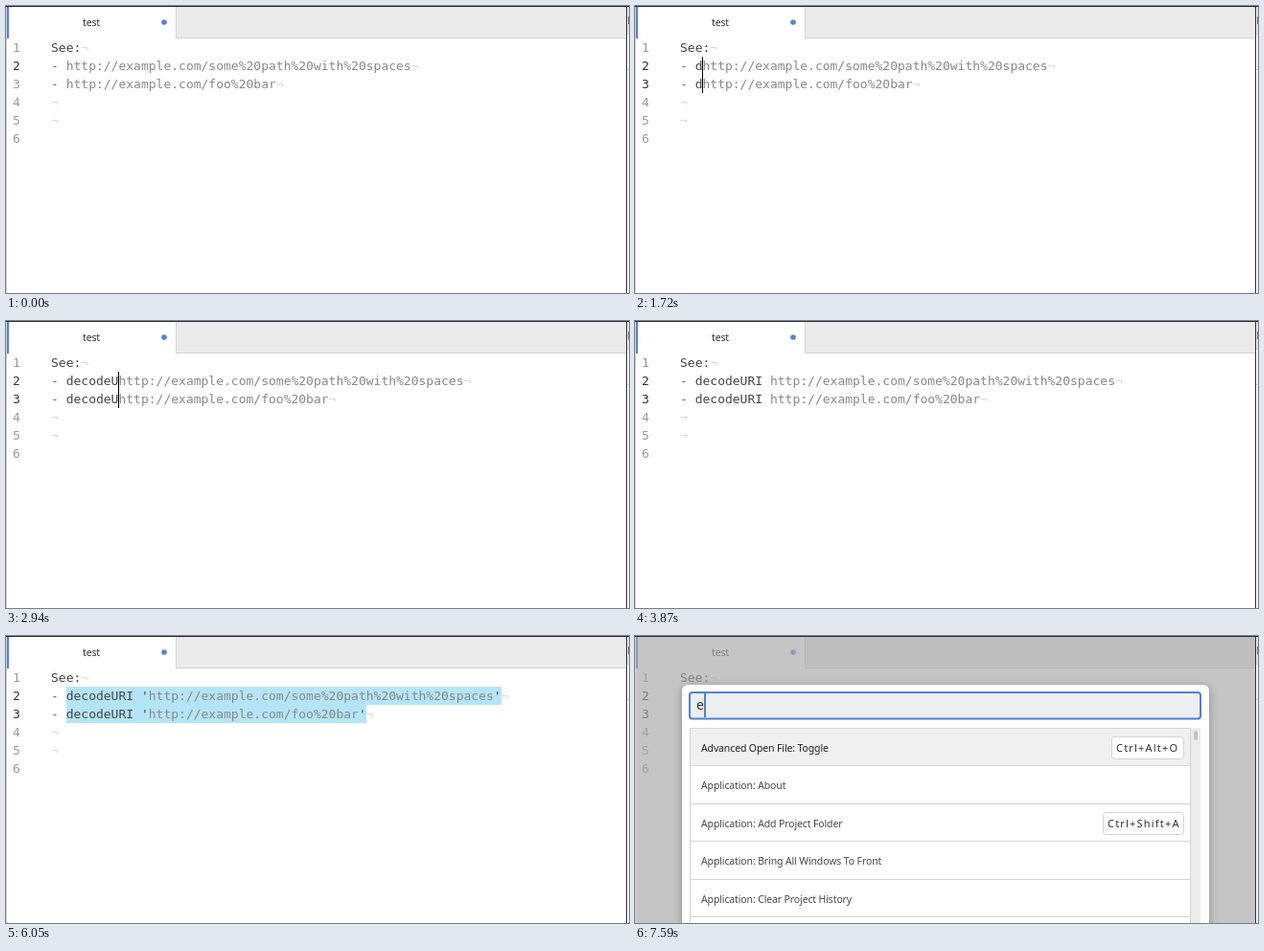
Animation, 650 px wide and 300 px high, one loop 8000 ms. Source, as an HTML page:

```html
<!DOCTYPE html>
<html lang="en">
<head>
<meta charset="utf-8">
<title>Editor</title>
<style>
  html, body { margin: 0; width: 650px; height: 300px; overflow: hidden; background: #fff; }
  svg { display: block; }
  text { white-space: pre; }
  .code { font: 13px "DejaVu Sans Mono", monospace; fill: #444; }
  .ui { font: 10.5px "Noto Sans", sans-serif; letter-spacing: -.13px; fill: #484848; }
  .keys { font: 11px "Noto Sans", sans-serif; letter-spacing: 1.2px; fill: #333; }
  .num { fill: #999; }
  .num.active { fill: #333; }
  .dash { fill: #6c6c6c; }
  .url { fill: #888; }
  .eol { fill: #d9d9d9; }
  .sel { fill: #b4e5f7; }
  .line { fill: #d4d4d4; }
  .box { fill: #fff; stroke: #d4d4d4; }
  .panel { fill: #fff; filter: drop-shadow(0 2px 4px rgba(0, 0, 0, .3)); }
</style>
</head>
<body>
<svg width="650" height="300" viewBox="0 0 650 300">
  <rect width="650" height="300" fill="#fff"/>
  <rect x="178" y="1" width="469" height="32" fill="#eaeaea"/>
  <rect class="line" x="177" y="1" width="1" height="33"/>
  <rect class="line" x="177" y="33" width="470" height="1"/>
  <rect x="1" y="1" width="2" height="33" fill="#5381dc"/>
  <text class="ui" x="89" y="21" text-anchor="middle" style="fill:#333">test</text>
  <circle cx="165" cy="17" r="2.8" fill="#5381e0"/>

  <g id="editor" class="code"></g>
  <rect id="dim" x="1" y="1" width="646" height="299" fill="#a8a8a8" opacity="0"/>

  <g id="palette">
    <rect class="panel" x="49" y="51" width="550" height="270" rx="6"/>
    <rect x="57" y="59" width="533" height="27.5" rx="3" fill="#edeef0" stroke="#4f80d9" stroke-width="2"/>
    <text id="query" x="64" y="77" style="font:14px 'Noto Sans',sans-serif;fill:#333">e</text>
    <rect id="caret" y="60" width="2" height="25" fill="#4f80d9"/>
    <g id="list"></g>
    <rect x="580" y="96" width="10" height="204" fill="#ebebeb"/>
    <rect x="583" y="99" width="4" height="10" rx="2" fill="#c2c2c2"/>
  </g>

  <rect width="647" height="1" fill="#2b2d38"/>
  <rect class="line" y="1" width="1" height="299"/>
  <rect x="648" width="2" height="300" fill="#fafafa"/>
  <rect x="648" y="1" width="2" height="28" fill="#e4e4e4"/>
  <rect x="649" y="11" width="1" height="8" fill="#777"/>
  <rect class="line" x="648" y="29" width="2" height="1"/>
  <rect class="line" x="648" y="66" width="2" height="1"/>
  <rect x="647" width="1" height="300" fill="#33343c"/>
  <rect x="647" width="3" height="1" fill="#2b2d38"/>
</svg>
<script>
const LOOP = 8000, LEFT = 47, CHAR = 13 * 0.60205, ROW = 19;
const $ = id => document.getElementById(id);
const colX = col => LEFT + col * CHAR;

function add(parent, tag, attrs, text = '') {
  const el = document.createElementNS('http://www.w3.org/2000/svg', tag);
  for (const k in attrs) el.setAttribute(k, attrs[k]);
  el.textContent = text;
  parent.append(el);
  return el;
}

// Timing of the edit, in ms
const COMMAND = "decodeURI '";
const keyTimes = [1720, 1890, 2130, 2270, 2380, 2550, 2940, 3090, 3220, 3420, 3960];
const caretOff = [[0, 290], [660, 720], [1190, 1590], [3870, 3960], [4900, 5030], [5360, LOOP]];
const SECOND_CARET = 720, JUMP_TO_END = 4380, CLOSE_QUOTE = 5030;
const selectTimes = [5360, 5880, 6050];
const OPEN = 7130, QUERY = 7590;

const editor = $('editor');
const baseline = row => 48 + row * ROW;
const numbers = [...Array(6).keys()].map(i =>
  add(editor, 'text', { class: 'num', x: 7, y: baseline(i) }, i + 1));
numbers[1].classList.add('active');

add(editor, 'text', { x: LEFT, y: baseline(0) }, 'See:');
add(editor, 'text', { class: 'eol', x: colX(4), y: baseline(0) }, '¬');
for (const row of [3, 4]) add(editor, 'text', { class: 'eol', x: LEFT, y: baseline(row) }, '¬');

const lines = ['http://example.com/some%20path%20with%20spaces', 'http://example.com/foo%20bar']
  .map((url, i) => {
    const top = 53 + i * ROW;
    const sel = add(editor, 'rect', { class: 'sel', y: top, height: ROW });
    const text = add(editor, 'text', { x: LEFT, y: baseline(i + 1) });
    add(text, 'tspan', { class: 'dash' }, '- ');
    const typed = add(text, 'tspan', {});
    add(text, 'tspan', { class: 'url' }, url);
    const close = add(text, 'tspan', {});
    add(text, 'tspan', { class: 'eol' }, '¬');
    const caret = add(editor, 'rect', { y: top, width: 1, height: ROW, fill: '#000' });
    return { url, sel, typed, close, caret };
  });

const list = $('list');
[
  ['Advanced Open File: Toggle', 'Ctrl+Alt+O', 497],
  ['Application: About'],
  ['Application: Add Project Folder', 'Ctrl+Shift+A', 488],
  ['Application: Bring All Windows To Front'],
  ['Application: Clear Project History'],
  ['']
].forEach(([label, keys, x], i) => {
  const y = Math.floor(97 + i * 39.5);
  if (!i) add(list, 'rect', { x: 57, y, width: 523, height: 39, fill: '#f0f0f0' });
  add(list, 'rect', { class: 'line', x: 57, y: y - 1, width: 523, height: 1 });
  add(list, 'text', { class: 'ui', x: 69, y: y + 23.5, style: i ? '' : 'fill:#222' }, label);
  if (keys) {
    add(list, 'rect', { class: 'box', x: x + .5, y: y + 8.5, width: 75 + 497 - x, height: 23, rx: 3 });
    add(list, 'text', { class: 'keys', x: x + 5, y: y + 24 }, keys);
  }
});
for (const x of [57, 579]) add(list, 'rect', { class: 'line', x, y: 96, width: 1, height: 204 });

const show = (el, on) => el.setAttribute('visibility', on ? 'visible' : 'hidden');
const countPast = (times, t) => times.filter(at => t >= at).length;

// The backdrop fades in six steps, easing out
function dimAt(t) {
  if (t < OPEN) return 0;
  const step = Math.min(5, Math.floor((t - OPEN) / 50));
  const p = Math.min(1, (35 + step * 50) / 250);
  return 0.66 * (1 - (1 - p) ** 3);
}

function draw(t) {
  const typed = COMMAND.slice(0, countPast(keyTimes, t));
  const quote = t >= CLOSE_QUOTE ? "'" : '';
  const selected = countPast(selectTimes, t);
  const lit = !caretOff.some(([from, to]) => t >= from && t < to);
  const both = t >= SECOND_CARET;
  numbers[2].classList.toggle('active', both);

  lines.forEach((line, i) => {
    line.typed.textContent = typed;
    line.close.textContent = quote;
    const end = 2 + typed.length + line.url.length + quote.length;
    const col = t >= JUMP_TO_END ? end : 2 + typed.length;
    line.caret.setAttribute('x', Math.round(colX(col)));
    show(line.caret, lit && (both || !i));
    show(line.sel, selected);
    const start = Math.round(colX(Math.max(0, selected - 1)));
    line.sel.setAttribute('x', start);
    line.sel.setAttribute('width', Math.round(colX(end)) - start);
  });

  $('dim').setAttribute('opacity', dimAt(t));
  show($('palette'), t >= OPEN);
  $('query').textContent = t >= QUERY ? 'e' : '';
  $('caret').setAttribute('x', t >= QUERY ? 72 : 64);
}

const begin = performance.now();
function tick() {
  draw((performance.now() - begin) % LOOP);
  requestAnimationFrame(tick);
}
tick();
</script>
</body>
</html>
```
